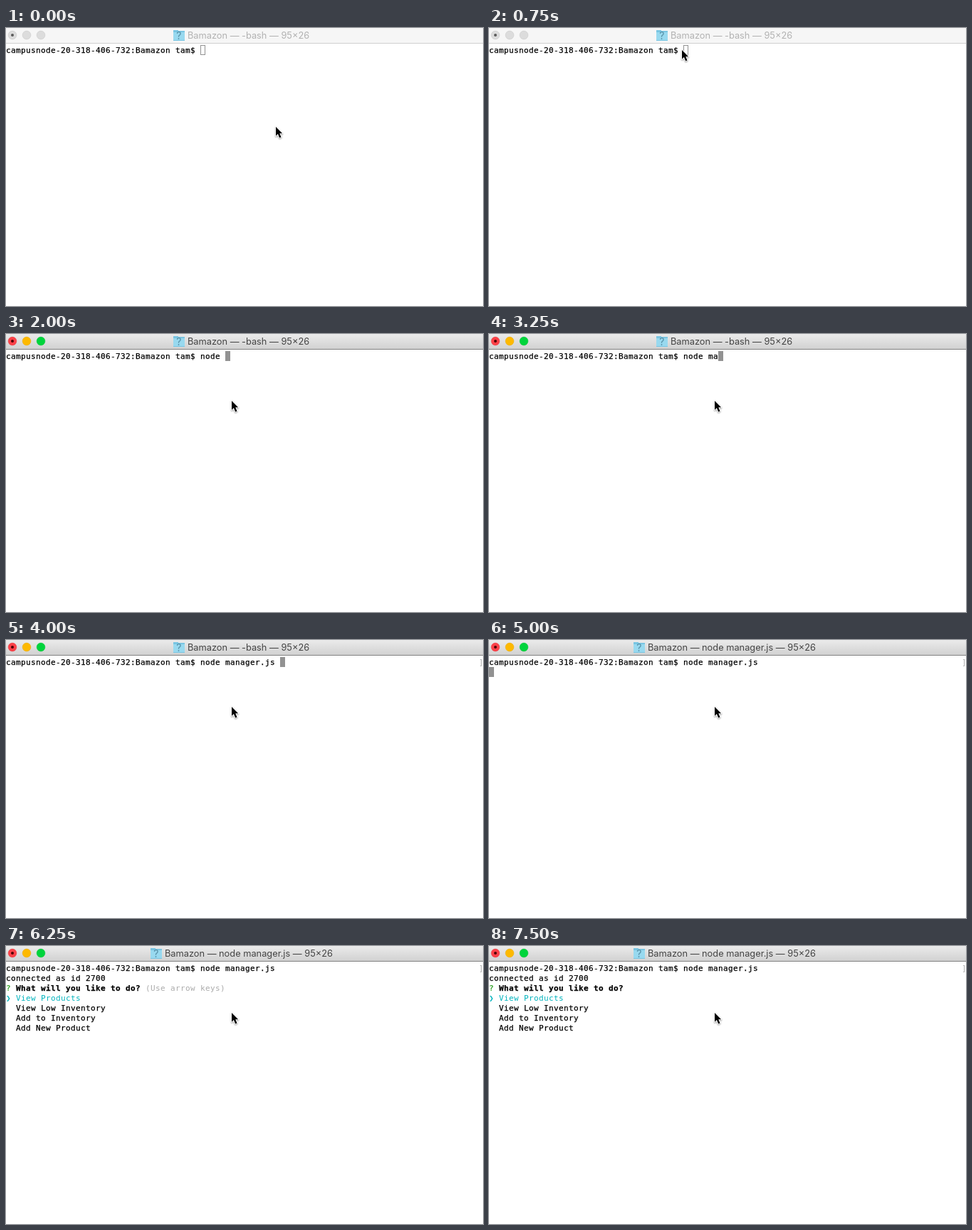
An HTML page with a canvas that plays this animation: 670 px wide and 391 px high, repeating every 8000 ms.

```html
<!DOCTYPE html>
<html lang="en">
<head>
<meta charset="utf-8">
<title>Terminal session</title>
<style>
  html, body { margin: 0; width: 100%; height: 100%; overflow: hidden; background: #fff; }
  canvas { display: block; }
</style>
</head>
<body>
<canvas id="stage" width="670" height="391"></canvas>
<script>
const ctx = document.getElementById('stage').getContext('2d');
const LOOP = 8000, CELL = 7, LINE = 14, TOP = 24;
const PROMPT = 'campusnode-20-318-406-732:Bamazon tam$ ';
const MENU = ['View Products', 'View Low Inventory', 'Add to Inventory', 'Add New Product'];
const GREY = '#ababab', CYAN = '#00b3bd';

const POINTER = [[0, [379, 139]], [500, [307, 58]], [750, [271, 31]], [1250, [317, 94]]];
const TYPED = [[0, ''], [1500, 'n'], [1750, 'nod'], [2000, 'node '], [3250, 'node ma'],
  [3500, 'node mana'], [4000, 'node manager.js ']];
const CHOICE = [[0, 0], [7250, 1], [7500, 0]];

// Value of the last step that has begun at time t
const at = (steps, t) => steps.filter(([start]) => start <= t).pop()[1];

// The thin stroke gives the slightly heavy look of smoothed terminal text
function write(text, col, row, color = '#000', weight = 'normal') {
  ctx.font = `${weight} 11px "DejaVu Sans Mono", monospace`;
  ctx.fillStyle = ctx.strokeStyle = color;
  ctx.lineWidth = 0.25;
  [...text].forEach((ch, i) => {
    const x = (col + i) * CELL, y = TOP + row * LINE + 11;
    ctx.fillText(ch, x, y);
    if (color === '#000') ctx.strokeText(ch, x, y);
  });
}

function disc(x, y, r, fill, edge) {
  ctx.beginPath();
  ctx.arc(x, y, r, 0, 2 * Math.PI);
  ctx.fillStyle = fill;
  ctx.fill();
  if (edge) {
    ctx.strokeStyle = edge;
    ctx.lineWidth = 0.5;
    ctx.stroke();
  }
}

function folder(x, y) {
  ctx.fillStyle = '#79c5e2';
  ctx.fillRect(x, y, 7, 3);
  ctx.fillRect(x, y + 1, 16, 14);
  ctx.fillStyle = '#98d9ef';
  ctx.fillRect(x, y + 3, 16, 11);
  ctx.fillStyle = '#568fa6';
  ctx.font = '14px Inter, sans-serif';
  ctx.fillText('?', x + 4.3, y + 12.5);
}

function titleBar(active, running) {
  const shade = ctx.createLinearGradient(0, 0, 0, 21);
  shade.addColorStop(0, active ? '#ebebeb' : '#f6f6f6');
  shade.addColorStop(1, active ? '#d1d1d1' : '#f6f6f6');
  ctx.fillStyle = shade;
  ctx.fillRect(0, 0, 670, 21);
  ctx.fillStyle = active ? '#828282' : '#cfcfcf';
  ctx.fillRect(0, 21, 670, 1);

  const lights = active
    ? [['#fc4148', '#e8383f'], ['#fdb900', '#eba900'], ['#00d43c', '#00c234']]
    : Array(3).fill(['#dcdcdc', '#c4c4c4']);
  lights.forEach(([fill, edge], i) => disc(9 + 20 * i, 10, 5.9, fill, edge));
  disc(9, 10, 2, active ? '#4c0004' : '#5c5c5c');

  const x = running ? 203 : 235;
  folder(x, 3);
  ctx.font = '12.8px Inter, sans-serif';
  ctx.fillStyle = active ? '#444' : '#b2b2b2';
  ctx.fillText(`Bamazon — ${running ? 'node manager.js' : '-bash'} — 95×26`, x + 20, 15);
}

function caret(col, row, solid) {
  const x = col * CELL, y = TOP + row * LINE;
  ctx.fillStyle = ctx.strokeStyle = '#929292';
  ctx.lineWidth = 1;
  if (solid) ctx.fillRect(x, y, CELL, LINE);
  else ctx.strokeRect(x + 0.5, y + 0.5, CELL - 1, LINE - 1);
}

function menu(t) {
  write('connected as id 2700', 0, 1);
  write('?', 0, 2, '#3da633', 'bold');
  write('What will you like to do?', 2, 2, '#000', 'bold');
  if (t < 7250) write('(Use arrow keys)', 28, 2, GREY);
  const choice = at(CHOICE, t);
  write('❯', 0, 3 + choice, CYAN);
  MENU.forEach((item, i) => write(item, 2, 3 + i, i === choice ? CYAN : '#000'));
}

function pointer([x, y]) {
  const shape = new Path2D('M0 0V12.8L2.9 10.1L5.2 15.4L7.5 14.4L5.3 9.3H9.2Z');
  ctx.save();
  ctx.translate(x, y);
  ctx.lineJoin = 'round';
  ctx.lineWidth = 2;
  ctx.strokeStyle = '#fff';
  ctx.shadowColor = 'rgba(0,0,0,.4)';
  ctx.shadowBlur = 2;
  ctx.shadowOffsetY = 1;
  ctx.stroke(shape);
  ctx.shadowColor = 'transparent';
  ctx.fillStyle = '#000';
  ctx.fill(shape);
  ctx.restore();
}

function draw() {
  const t = performance.now() % LOOP;
  const line = PROMPT + at(TYPED, t);
  ctx.fillStyle = '#fff';
  ctx.fillRect(0, 0, 670, 391);
  titleBar(t >= 1000, t >= 5000);
  write(line, 0, 0);
  if (t >= 4000) write(']', 664 / CELL, 0, GREY);
  if (t < 4750) caret(line.length, 0, t >= 1000);
  else if (t < 5500) caret(0, 1, true);
  else menu(t);
  pointer(at(POINTER, t));
  requestAnimationFrame(draw);
}
draw();
</script>
</body>
</html>
```
